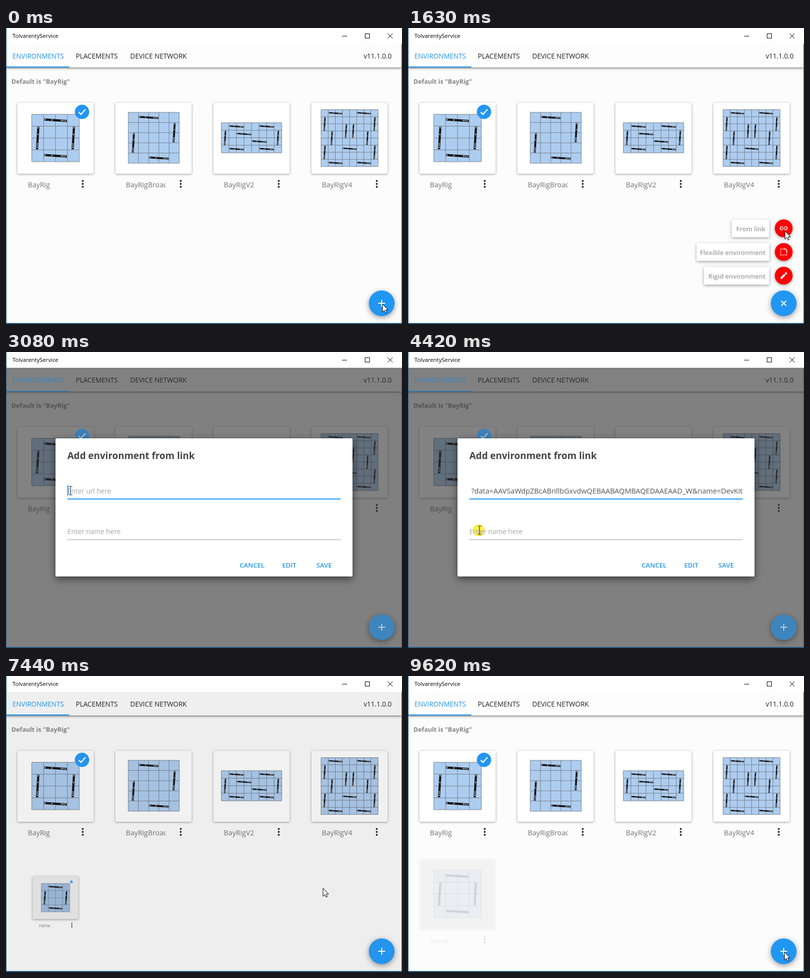
Animation, 800 px wide and 600 px high, one loop 9690 ms. Source, as an HTML page with a canvas:

```html
<!DOCTYPE html>
<html lang="en">
<head>
<meta charset="utf-8">
<title>Environments</title>
<style>
  html, body { margin: 0; width: 100%; height: 100%; overflow: hidden; background: #fcfcfc; }
  canvas { display: block; }
</style>
</head>
<body>
<canvas id="stage" width="800" height="600"></canvas>
<script>
const ctx = document.getElementById('stage').getContext('2d');
const LOOP = 9690;
const BLUE = [33, 150, 243], WHITE = [255, 255, 255];
const URL_TAIL = '?data=AAVSaWdpZBcABnllbGxvdwQEBAABAQMBAQEDAAEAAD_W&name=DevKit';
let t = 0;

// h and v hold the centres of the bars, counted in cells
const kit = {
  name: 'BayRig', x: 23, y: 151, left: 29, top: 24, cols: 4, rows: 4, cell: 24,
  h: [[2, .5], [2, 3.5]], v: [[.5, 2], [3.5, 2]]
};
const cards = [
  kit,
  { name: 'BayRigBroadened', x: 221, y: 151, left: 26, top: 20, cols: 5, rows: 5, cell: 20.6,
    h: [[2, .5], [3, 4.5]], v: [[.5, 3], [4.5, 2]] },
  { name: 'BayRigV2', x: 419, y: 151, left: 16, top: 41, cols: 8, rows: 4, cell: 15.25,
    h: [[2, .5], [6, .5], [3, 1.5], [5, 2.5], [2, 3.5], [6, 3.5]], v: [[.5, 2], [7.5, 2]] },
  { name: 'BayRigV4', x: 617, y: 151, left: 19.5, top: 14.5, cols: 8, rows: 8, cell: 14.4,
    h: [[2, .5], [6, .5], [4, 5.5], [2, 7.5], [6, 7.5]],
    v: [[.5, 2], [7.5, 2], [3.5, 3], [4.5, 3], [1.5, 4], [6.5, 4], [.5, 6], [7.5, 6]] }
];
const newCard = { ...kit, name: 'name', y: 369.5 };

// Pointer moves: start, end, steps, target x, target y
const moves = [
  [670, 1160, 8, 761.5, 411.5],
  [1970, 2810, 13, 130, 281],
  [3010, 3210, 3, 132, 281.5],
  [4000, 4290, 5, 144.5, 361.5],
  [5880, 6830, 12, 638, 426],
  [6900, 6970, 2, 640.5, 430],
  [7510, 8130, 10, 752, 537.5],
  [8200, 8340, 3, 760.5, 556],
  [8540, 8610, 2, 760.5, 559.5]
];

// Stepped progress: first step lands on start, last one on end
function step(start, end, count) {
  if (t < start) return 0;
  const k = Math.floor((t - start) * (count - 1) / (end - start) + .001);
  return Math.min(1, (k + 1) / count);
}
const smooth = p => p * p * (3 - 2 * p);
const outCubic = p => 1 - (1 - p) ** 3;
const mix = (a, b, p) => `rgb(${a.map((v, i) => Math.round(v + (b[i] - v) * p))})`;

function text(str, x, y, size, color, weight = 400, align = 'left') {
  ctx.font = `${weight} ${size}px "Open Sans", "Noto Sans", sans-serif`;
  ctx.textAlign = align;
  ctx.fillStyle = color;
  ctx.fillText(str, x, y);
}
function rect(x, y, w, h, color) {
  ctx.fillStyle = color;
  ctx.fillRect(x, y, w, h);
}
function disc(x, y, r, color) {
  ctx.fillStyle = color;
  ctx.beginPath();
  ctx.arc(x, y, r, 0, 7);
  ctx.fill();
}
function line(points, color, width = 1) {
  ctx.strokeStyle = color;
  ctx.lineWidth = width;
  ctx.beginPath();
  points.forEach(([x, y]) => ctx.lineTo(x, y));
  ctx.stroke();
}
function at(x, y, draw, scale = 1, angle = 0) {
  ctx.save();
  ctx.translate(x, y);
  ctx.rotate(angle);
  ctx.scale(scale, scale);
  draw();
  ctx.restore();
}
function shadowed(blur, dy, alpha, draw) {
  ctx.save();
  ctx.shadowColor = `rgba(0,0,0,${alpha})`;
  ctx.shadowBlur = blur;
  ctx.shadowOffsetY = dy;
  draw();
  ctx.restore();
}
function panel(x, y, w, h, color = '#fff') {
  ctx.fillStyle = color;
  ctx.beginPath();
  ctx.roundRect(x, y, w, h, 2);
  ctx.fill();
}
function clipped(x, y, w, h, draw) {
  ctx.save();
  ctx.beginPath();
  ctx.rect(x, y, w, h);
  ctx.clip();
  draw();
  ctx.restore();
}

function bar(x, y, cell, angle) {
  at(x, y, () => {
    rect(-.95, -.09, 1.9, .18, '#111');
    for (const d of [-.87, -.3, .5, .64, .8]) disc(d, 0, .05, '#ddd');
  }, cell, angle);
}
function board({ cols, rows, cell, h, v }) {
  const w = cols * cell, ht = rows * cell;
  rect(0, 0, w, ht, '#adcdf0');
  for (let i = 0; i <= cols; i++) line([[i * cell, 0], [i * cell, ht]], '#777f88');
  for (let i = 0; i <= rows; i++) line([[0, i * cell], [w, i * cell]], '#777f88');
  for (const [x, y] of h) bar(x * cell, y * cell, cell, .065);
  for (const [x, y] of v) bar(x * cell, y * cell, cell, Math.PI / 2 + .06);
}
function card(c) {
  shadowed(4, 1, .4, () => panel(c.x, c.y + .5, 154, 144));
  at(c.x + c.left, c.y + c.top, () => board(c));
  clipped(c.x + 20, c.y + 150, 81.5, 32, () => text(c.name, c.x + 21, c.y + 172, 14.3, '#757575'));
  for (const y of [159, 165, 171]) disc(c.x + 132, c.y + y, 1.9, '#222');
}
function badge(x, y, color, tick, scale = 1) {
  at(x, y, () => {
    disc(0, 0, 14.5, color);
    line([[-6.5, .5], [-2, 5], [7, -5]], tick, 2.5);
  }, scale);
}

function titleBar() {
  rect(0, 0, 800, 32, '#fff');
  text('TolvarentyService', 13, 20, 11.4, '#000');
  line([[679, 16.5], [689, 16.5]], '#000');
  ctx.strokeRect(725.5, 11.5, 9, 9);
  line([[771, 11], [781, 21]], '#000');
  line([[781, 11], [771, 21]], '#000');
}
function page() {
  rect(0, 32, 800, 568, '#fcfcfc');
  shadowed(5, 1, .65, () => rect(0, 32, 800, 48, '#fdfdfd'));
  text('PLACEMENTS', 141, 62, 13.6, '#222');
  text('DEVICE NETWORK', 251, 62, 13.6, '#222');
  text('v11.1.0.0', 779, 62, 13.6, '#222', 400, 'right');
  text('Default is "BayRig"', 11, 113, 12.6, '#858585', 700);
  cards.forEach(card);
}
function addedCard() {
  const grow = step(7310, 7570, 5);
  if (!grow) return;
  ctx.save();
  ctx.globalAlpha = 1 - .88 * step(9340, 9620, 5);
  at(100, 461, () => {
    ctx.translate(-100, -461);
    card(newCard);
    if (grow < 1) {
      rect(23, 370, 154, 144, `rgba(0,0,0,${.3 * (1 - grow)})`);
      badge(153.5, 388, mix(BLUE, BLUE, 0), '#fff', Math.max(0, 1 - 1.17 * grow));
    }
  }, grow);
  ctx.restore();
}
function accents(dim, modal) {
  const color = mix(BLUE, modal ? [60, 130, 186] : [27, 112, 182], modal || dim);
  text('ENVIRONMENTS', 13, 62, 13.6, color);
  rect(1, 78, 127, 2, color);
  badge(153.5, 170, color, mix(WHITE, [180, 190, 200], modal || dim));
}
function fab(open, modal) {
  shadowed(12, 3, .4, () => disc(759, 558, 26, mix(BLUE, [62, 133, 190], modal)));
  at(759, 558, () => {
    const color = mix(WHITE, [190, 203, 214], modal);
    line([[-7, 0], [7, 0]], color, 2);
    line([[0, -7], [0, 7]], color, 2);
  }, 1, open * Math.PI / 4);
}

const icons = [
  function link() {
    ctx.lineWidth = 1.6;
    for (const side of [-1, 1]) {
      ctx.beginPath();
      ctx.moveTo(side * 1.3, -3.2);
      ctx.lineTo(side * 3.8, -3.2);
      ctx.arc(side * 3.8, 0, 3.2, -Math.PI / 2, Math.PI / 2, side < 0);
      ctx.lineTo(side * 1.3, 3.2);
      ctx.stroke();
    }
    line([[-3, 0], [3, 0]], '#fff', 1.6);
  },
  function flexible() {
    for (let i = -6; i <= 6; i += 3) {
      rect(-7, i - .8, 1.6, 1.6, '#fff');
      rect(i - .8, 5.4, 1.6, 1.6, '#fff');
      if (i > 0) rect(5.4, i - .8, 1.6, 1.6, '#fff');
      if (i < -2) rect(i - .8, -7, 1.6, 1.6, '#fff');
    }
    ctx.lineWidth = 1.8;
    ctx.beginPath();
    ctx.moveTo(-1, -6.2);
    ctx.lineTo(2, -6.2);
    ctx.arcTo(6.2, -6.2, 6.2, -2, 4);
    ctx.lineTo(6.2, 1);
    ctx.stroke();
  },
  function pen() {
    line([[-5.8, 5.8], [2.6, -2.6]], '#fff', 4);
    line([[3.6, -3.6], [5.8, -5.8]], '#fff', 4.6);
  }
];
function speedDial(open) {
  if (!open) return;
  ctx.save();
  ctx.globalAlpha = open;
  [['From link', 76], ['Flexible environment', 147], ['Rigid environment', 132]].forEach(([label, w], i) => {
    const y = 406 + 48 * i;
    shadowed(6, 2, .35, () => panel(730 - w, y - 18, w, 36));
    text(label, 722, y + 6, 13, '#9e9e9e', 600, 'right');
    shadowed(6, 2, .35, () => disc(759, y, 18 * open, '#f00'));
    ctx.strokeStyle = '#fff';
    at(759, y, icons[i], open);
  });
  ctx.restore();
}

function field(y, value, hint, focused) {
  if (focused) rect(124, y + 15, 552, 2, '#2196f3');
  else rect(124, y + 16, 552, 1, '#9e9e9e');
  if (!value) text(hint, 124, y + 5, 13.8, '#a6a6a6');
}
function caret(x, y) {
  rect(x, y - 12, 2, 21, '#2196f3');
}
function dialog(opacity, scale) {
  if (opacity <= 0) return;
  const pasted = t >= 3410, onName = t >= 4490;
  const typed = 'name'.slice(0, [5150, 5290, 5490, 5680].filter(ms => t >= ms).length);
  ctx.save();
  ctx.globalAlpha = opacity;
  at(400, 315, () => {
    ctx.translate(-400, -315);
    shadowed(16, 5, .55, () => panel(100, 175, 600, 280));
    text('Add environment from link', 124, 217, 19, '#444', 700);
    if (t >= 4350 && t < 4560) disc(143, 361.5, 12, '#fff04a');
    field(282, pasted, 'Enter url here', !onName);
    field(364, typed, 'Enter name here', onName);
    if (pasted) {
      clipped(124, 265, 553, 30, () => text(URL_TAIL, 676, 287, 14.6, '#555', 400, 'right'));
    }
    text(typed, 124, 369, 13.9, '#555');
    const typedWidth = ctx.measureText(typed).width;

    if (!pasted && (t - 1700) % 1000 < 500) caret(124, 282);
    if (pasted && t < 3800) caret(676, 282);
    if (onName && (t < 4950 || t >= 5150 && (t < 5680 || (t - 5680) % 1220 < 610))) {
      caret(124 + typedWidth, 364);
    }
    text('CANCEL', 472, 437, 13.2, '#2196f3', 600);
    text('EDIT', 558, 437, 13.2, '#2196f3', 600);
    text('SAVE', 627, 437, 13.2, '#2196f3', 600);
  }, scale);
  ctx.restore();
}

function pointer() {
  let x = 760.5, y = 559.5;
  for (const [start, end, count, toX, toY] of moves) {
    const p = smooth(step(start, end, count));
    x += (toX - x) * p;
    y += (toY - y) * p;
  }
  const overField = t >= 1770 && t < 7170 && x > 123 && x < 676 &&
    (y > 265 && y < 299 || y > 347 && y < 381);
  at(x, y, () => {
    if (overField) {
      line([[0, -8], [0, 8]], '#222');
      for (const end of [-8.5, 8.5]) line([[-3.5, end], [3.5, end]], '#222');
      return;
    }
    ctx.beginPath();
    [[0, 0], [0, 16.5], [3.7, 13], [6, 18.4], [8.6, 17.3], [6.3, 12], [11.3, 12]]
      .forEach(([px, py]) => ctx.lineTo(px, py));
    ctx.closePath();
    ctx.fillStyle = '#fff';
    ctx.fill();
    ctx.strokeStyle = '#000';
    ctx.lineWidth = 1;
    ctx.stroke();
  });
}

function render() {
  const opening = step(260, 470, 4);
  const entering = outCubic(step(1700, 1770, 2));
  const dialOpen = opening * (1 - step(1700, 1770, 2));
  const dim = opening * (1 - step(1560, 1630, 2));
  const modal = entering * (1 - step(7170, 7510, 6)) ** 2;
  const leaving = outCubic(step(7170, 7310, 3));

  page();
  rect(0, 32, 800, 568, `rgba(0,0,0,${.5 * dim})`);
  if (modal) rect(0, 32, 800, 568, `rgba(48,48,48,${.6 * modal})`);
  addedCard();
  accents(dim, modal);
  fab(dialOpen, modal);
  speedDial(dialOpen);
  dialog(entering * (1 - leaving), .9 + .1 * entering * (1 - leaving));
  titleBar();
  rect(0, 0, 1, 600, '#1d5a86');
  rect(799, 32, 1, 568, '#1d5a86');
  rect(0, 598, 800, 2, '#1d5a86');
  pointer();
}

const began = performance.now();
function tick() {
  t = (performance.now() - began) % LOOP;
  render();
  requestAnimationFrame(tick);
}
tick();
</script>
</body>
</html>
```
